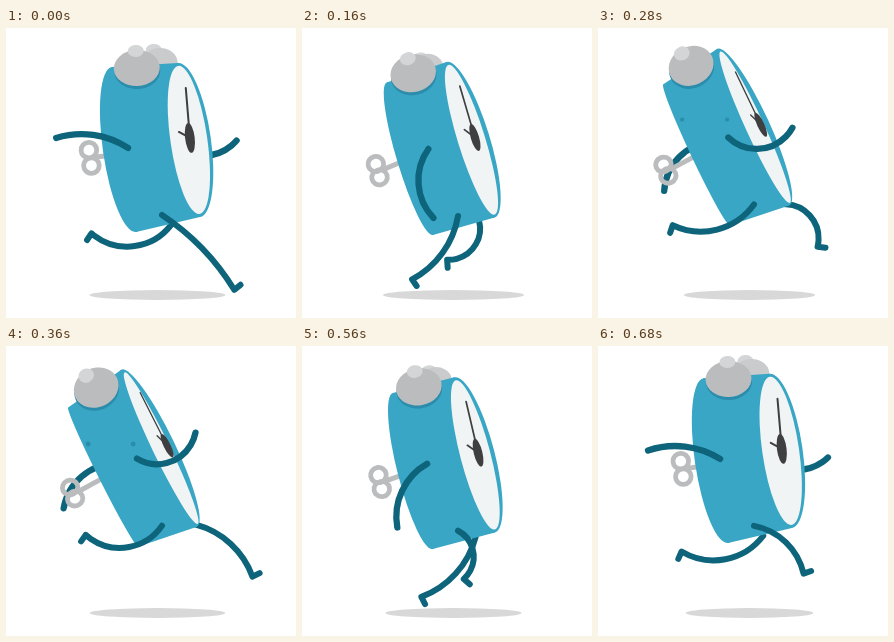
These frames come from a looping animation (290 px wide and 290 px high, 720 ms). An HTML page with a canvas:

```html
<!DOCTYPE html>
<html lang="en">
<head>
<meta charset="utf-8">
<title>Running alarm clock</title>
<style>
html, body { margin: 0; width: 100%; height: 100%; overflow: hidden; background: #fff; }
canvas { display: block; width: 290px; height: 290px; }
</style>
</head>
<body>
<canvas id="stage"></canvas>
<script>
const LOOP = 720, STEP = 40, SIZE = 290, RAD = Math.PI / 180;
const FAR_CONTACT = 385, ARM = 75, FOOT = 8, ANKLE = -97;
const BLUE = '#38a6c4', SHADE = '#2b8cab', INK = '#0d647b', FACE = '#f1f4f4',
      HANDS = '#3f3f41', GRAY = '#babcbe', LIGHT = '#d3d5d6', GROUND = '#d8d8d8';

// One stride, shared by both legs: time, direction, reach, curl
const stride = [
  [0, 46, 104, 25],     // contact
  [85, 91, 71, 42],     // support
  [205, 143, 84, 60],   // push off
  [345, 174, 79, 95],   // trailing
  [480, 137, 52, 107],  // lift
  [600, 59, 51, 106],   // knee up
  [690, 43, 73, 60]     // reach out
];
// Height of the case: time, offset
const hops = [[0, 0], [90, 5.5], [200, 2.5], [280, -4], [470, 5], [600, -3], [665, -8.5]];

const canvas = document.getElementById('stage');
const ctx = canvas.getContext('2d');
const dpr = window.devicePixelRatio || 1;
canvas.width = canvas.height = SIZE * dpr;
ctx.scale(dpr, dpr);
ctx.lineCap = ctx.lineJoin = 'round';

// Smooth periodic curve through the keys
function sample(keys, time) {
  const t = (time + LOOP) % LOOP, n = keys.length;
  const at = i => [keys[(i + n) % n][0] + Math.floor(i / n) * LOOP, keys[(i + n) % n]];
  let i = n - 1;
  while (keys[i][0] > t) i--;
  const [[ta, a], [tb, b], [tc, c], [td, d]] = [at(i - 1), at(i), at(i + 1), at(i + 2)];
  const h = tc - tb, u = (t - tb) / h, u2 = u * u, u3 = u2 * u;
  return b.slice(1).map((p, j) => {
    const q = c[j + 1];
    const m0 = (q - a[j + 1]) / (tc - ta) * h;
    const m1 = (d[j + 1] - p) / (td - tb) * h;
    return (2 * u3 - 3 * u2 + 1) * p + (u3 - 2 * u2 + u) * m0 + (3 * u2 - 2 * u3) * q + (u3 - u2) * m1;
  });
}

const polar = ([x, y], angle, r) => [x + r * Math.cos(angle * RAD), y + r * Math.sin(angle * RAD)];

function oval(x, y, rx, ry, rot, fill) {
  ctx.beginPath();
  ctx.ellipse(x, y, rx, ry, rot, 0, 7);
  ctx.fillStyle = fill;
  ctx.fill();
}

// Oval whose long axis runs from a to b
function axisOval(a, b, rx, inset, shift, fill) {
  const dx = b[0] - a[0], dy = b[1] - a[1];
  oval((a[0] + b[0]) / 2 + shift, (a[1] + b[1]) / 2, rx, Math.hypot(dx, dy) / 2 - inset, Math.atan2(-dx, dy), fill);
}

function stroke(width, color) {
  ctx.lineWidth = width;
  ctx.strokeStyle = color;
  ctx.stroke();
}

function line(a, b, width, color) {
  ctx.beginPath();
  ctx.moveTo(...a);
  ctx.lineTo(...b);
  stroke(width, color);
}

// Circular arc from a joint; dir and reach describe its chord, curl its total turn
function bend(joint, dir, reach, curl) {
  const side = 90 * Math.sign(curl), heading = dir - curl / 2;
  const r = reach / (2 * Math.sin(Math.abs(curl) / 2 * RAD));
  const from = heading - side;
  ctx.beginPath();
  ctx.arc(...polar(joint, heading + side, r), r, from * RAD, (from + curl) * RAD, curl < 0);
}

function arm(joint, dir, curl) {
  const half = Math.abs(curl) / 2 * RAD;
  bend(joint, dir, ARM * Math.sin(half) / half, curl);
  stroke(6.3, INK);
}

function leg(joint, t) {
  const [dir, reach, curl] = sample(stride, t);
  bend(joint, dir, reach, curl);
  ctx.lineTo(...polar(polar(joint, dir, reach), dir + curl / 2 + ANKLE, FOOT));
  stroke(6, INK);
}

function draw(t) {
  const lean = (1 - Math.cos((t + 16) / LOOP * 2 * Math.PI)) / 2;
  const [hop] = sample(hops, t);
  const mix = (a, b) => a + (b - a) * lean;
  // Point on the clock between upright and leaning
  const pt = (x0, y0, x1, y1) => [mix(x0, x1), mix(y0, y1) + hop];
  const tilt = -mix(.05, .45);

  ctx.clearRect(0, 0, SIZE, SIZE);
  oval(151.5, 267, 68 + .6 * hop, 5, 0, GROUND);

  arm(pt(165, 112, 110, 118), -10 + 150 * Math.sqrt(lean), -mix(100, 80));
  leg(pt(165, 197, 190, 179), t - FAR_CONTACT);

  // Winding key
  line(pt(90, 129, 76, 144), pt(99, 128, 96, 133), 5, GRAY);
  for (const [x, y] of [pt(83, 122, 64, 142), pt(85.5, 137.5, 69, 153)]) {
    ctx.beginPath();
    ctx.ellipse(x, y, 7.8, mix(7.8, 7.3), tilt, 0, 7);
    stroke(4.8, GRAY);
  }

  // Far bell
  oval(...pt(148, 22, 86, 31), 8, 6, tilt, LIGHT);
  oval(...pt(154, 35, 94, 38), mix(18, 15), 15, tilt, '#c9cbcc');

  // Case
  const backTop = pt(106, 39, 62, 62), backEnd = pt(130, 204, 132, 201);
  const top = pt(172, 35, 115, 24), end = pt(194, 189, 191, 181);
  axisOval(backTop, backEnd, mix(21, 4), 0, 0, BLUE);
  ctx.beginPath();
  for (const p of [backTop, top, end, backEnd]) ctx.lineTo(...p);
  ctx.fill();
  axisOval(top, end, mix(22, 16), 0, 0, BLUE);
  axisOval(top, end, mix(18.5, 8.5), 3, mix(0, 2), FACE);

  // Clock hands
  const hub = pt(184, 110, 161, 100), thin = mix(2, 1.3);
  line(hub, pt(180, 60, 134, 47), thin, HANDS);
  line(hub, pt(173, 104, 151, 90), thin, HANDS);
  oval(...hub, mix(4.8, 3.4), mix(15, 13), -mix(.12, .46), HANDS);

  // Near bell
  const [bx, by] = pt(131, 40, 90, 42), ry = mix(18, 19.5);
  oval(bx + .5, by + 3, 23, ry, tilt, SHADE);
  oval(bx, by, 23, ry, tilt, GRAY);
  oval(...pt(130, 23, 80, 30), 8, mix(6, 7), tilt, LIGHT);

  // Small dots that show on the side while leaning
  const dot = Math.max(0, lean - .45) * 4.5;
  for (const x of [127, 82]) oval(x + 28 * (1 - lean), 98 + (t - 360) * .08, dot, dot, 0, SHADE);

  leg(pt(156, 187, 156, 180), t);
  arm(pt(122, 120, 131, 113), mix(189, -25), -mix(50, 110));
}

function tick() {
  draw(Math.floor(performance.now() % LOOP / STEP) * STEP);
  requestAnimationFrame(tick);
}
tick();
</script>
</body>
</html>
```
